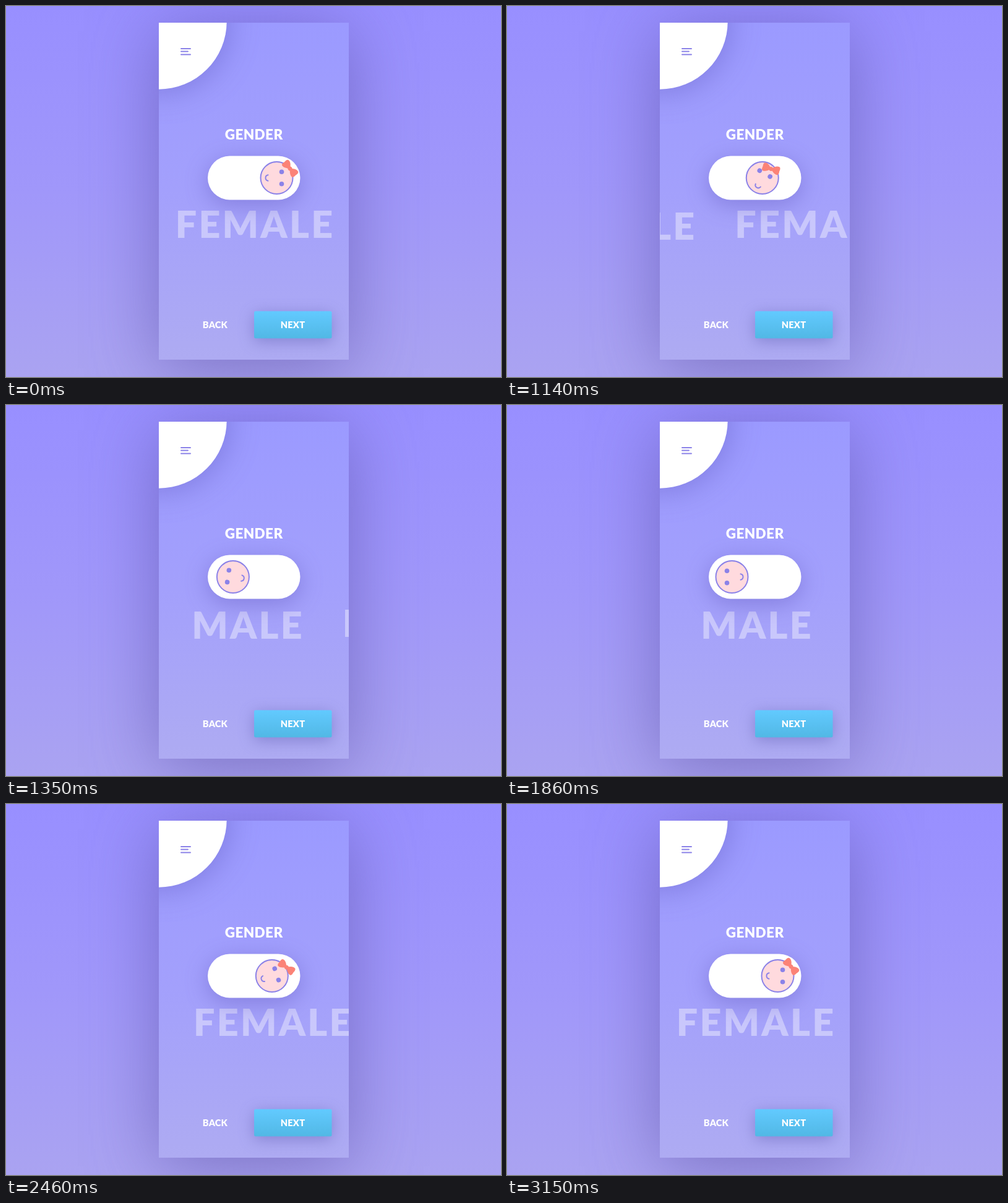
An HTML page that plays this animation: 800x600 px, repeating every 3180 ms.

```html
<!DOCTYPE html>
<html lang="en">
<head>
<meta charset="utf-8">
<title>Gender switch</title>
<style>
  html, body { margin: 0; width: 100%; height: 100%; overflow: hidden; background: #988fff; }
  svg { display: block; width: 800px; height: 600px; }
  text { font-family: Lato, "Open Sans", sans-serif; font-weight: 900; fill: #fff; text-anchor: middle; }
  .word { font-size: 61px; letter-spacing: 3.2px; fill-opacity: .4; }
  .title { font-size: 22.5px; letter-spacing: .4px; }
  .label { font-size: 14.6px; letter-spacing: .2px; }
  .card { filter: drop-shadow(0 14px 55px rgba(75, 65, 150, .5)); }
  .corner { filter: drop-shadow(4px 6px 24px rgba(85, 75, 180, .38)); }
  .pill { filter: drop-shadow(0 8px 18px rgba(85, 75, 180, .4)); }
  .button { filter: drop-shadow(0 5px 12px rgba(75, 75, 160, .4)); }
  .line { fill: none; stroke: #8b82e8; stroke-width: 2; stroke-linecap: round; }
</style>
</head>
<body>
<svg viewBox="0 0 800 600">
  <defs>
    <linearGradient id="sky" x2="0" y2="1">
      <stop stop-color="#988fff"/><stop offset=".5" stop-color="#a097fa"/><stop offset="1" stop-color="#aaa3f1"/>
    </linearGradient>
    <linearGradient id="panel" x2="0" y2="1">
      <stop stop-color="#9b9aff"/><stop offset=".5" stop-color="#a3a0fc"/><stop offset="1" stop-color="#aeabf2"/>
    </linearGradient>
    <linearGradient id="blue" x2="0" y2="1">
      <stop stop-color="#62caff"/><stop offset="1" stop-color="#51b8e5"/>
    </linearGradient>
    <clipPath id="inside"><rect x="247" y="27" width="307" height="545"/></clipPath>
  </defs>

  <rect width="800" height="600" fill="url(#sky)"/>
  <rect class="card" x="247" y="27" width="307" height="545" fill="url(#panel)"/>

  <g clip-path="url(#inside)">
    <circle class="corner" cx="247" cy="25" r="109.7" fill="#fff"/>
    <text id="female" class="word" x="402.5" y="375">FEMALE</text>
    <text id="male" class="word" x="404" y="378">MALE</text>
  </g>
  <path class="line" d="M283 69H298M283 73.5H294M283 78.5H298"/>

  <text class="title" x="400.7" y="216">GENDER</text>
  <rect class="pill" x="326" y="242.5" width="149.5" height="71" rx="35.5" fill="#fff"/>

  <circle id="head" cy="278" r="26" fill="#ffdade" stroke="#8b82e8" stroke-width="2"/>
  <g id="bow" fill="#fb8377">
    <path d="M0 0C-4-5-8-8-12-7Q-15-6-14 0Q-15 6-12 6.5C-8 7-4 4 0 0C4 4 8 7 12 6.5Q15 6 14 0Q15-6 12-7C8-8 4-5 0 0"/>
    <circle r="3.4"/>
  </g>
  <g id="face">
    <circle cx="-9.7" cy="-8" r="3.8" fill="#8b82e8"/>
    <circle cx="9.7" cy="-8" r="3.8" fill="#8b82e8"/>
    <path class="line" d="M-4.7 14Q-4 18 0 18Q4 18 4.7 14"/>
  </g>

  <text class="label" x="338" y="521.3">BACK</text>
  <rect class="button" x="401" y="493.5" width="125.5" height="44" rx="2.5" fill="url(#blue)"/>
  <text class="label" x="463.5" y="521.3">NEXT</text>
</svg>
<script>
const LOOP = 3180, TRAVEL = 283;
const el = id => document.getElementById(id);
const clamp = v => Math.min(1, Math.max(0, v));
const mix = (a, b, k) => a + (b - a) * k;
const place = (id, x, y, turn = 0) =>
  el(id).setAttribute('transform', `translate(${x} ${y}) rotate(${turn})`);

// Ease in and out along a Bezier with flat ends
function ease(x, a = .55, b = .567) {
  let lo = 0, hi = 1;
  for (let i = 0; i < 24; i++) {
    const s = (lo + hi) / 2, r = 1 - s;
    if (3 * s * r * r * a + 3 * s * s * r * b + s ** 3 < x) lo = s; else hi = s;
  }
  return lo * lo * (3 - 2 * lo);
}

// Critically damped spring, time in ms
function spring(t) {
  const k = Math.max(0, t) * .0198;
  return 1 - (1 + k) * Math.exp(-k);
}

// 1 = female, 0 = male
const switchAt = t => t < 1860 ? 1 - ease(clamp((t - 900) / 530)) : spring(t - 2267);

// Bow pose relative to the head: x, y, angle
const bowPoses = [[4, -15, -4], [23.5, -14, 37], [21.5, -15, 50]];
function bowAt(p) {
  const late = p > .895;
  const [from, to] = late ? bowPoses.slice(1) : bowPoses;
  const k = late ? (p - .895) / .105 : (p - .424) / .471;
  return from.map((v, i) => mix(v, to[i], k));
}

function draw(t) {
  const p = switchAt(t), x = mix(363.5, 437.5, p);
  const [bx, by, turn] = bowAt(p);
  place('female', TRAVEL * (1 - p), 0);
  place('male', -TRAVEL * p, 0);
  el('head').setAttribute('cx', x);
  place('face', x, 278, mix(-90, 90, p));
  place('bow', x + bx, 278 + by, turn);
  el('bow').setAttribute('opacity', clamp((p - .35) / .07));
}

const start = performance.now();
function tick() {
  draw((performance.now() - start) % LOOP);
  requestAnimationFrame(tick);
}
tick();
</script>
</body>
</html>
```
